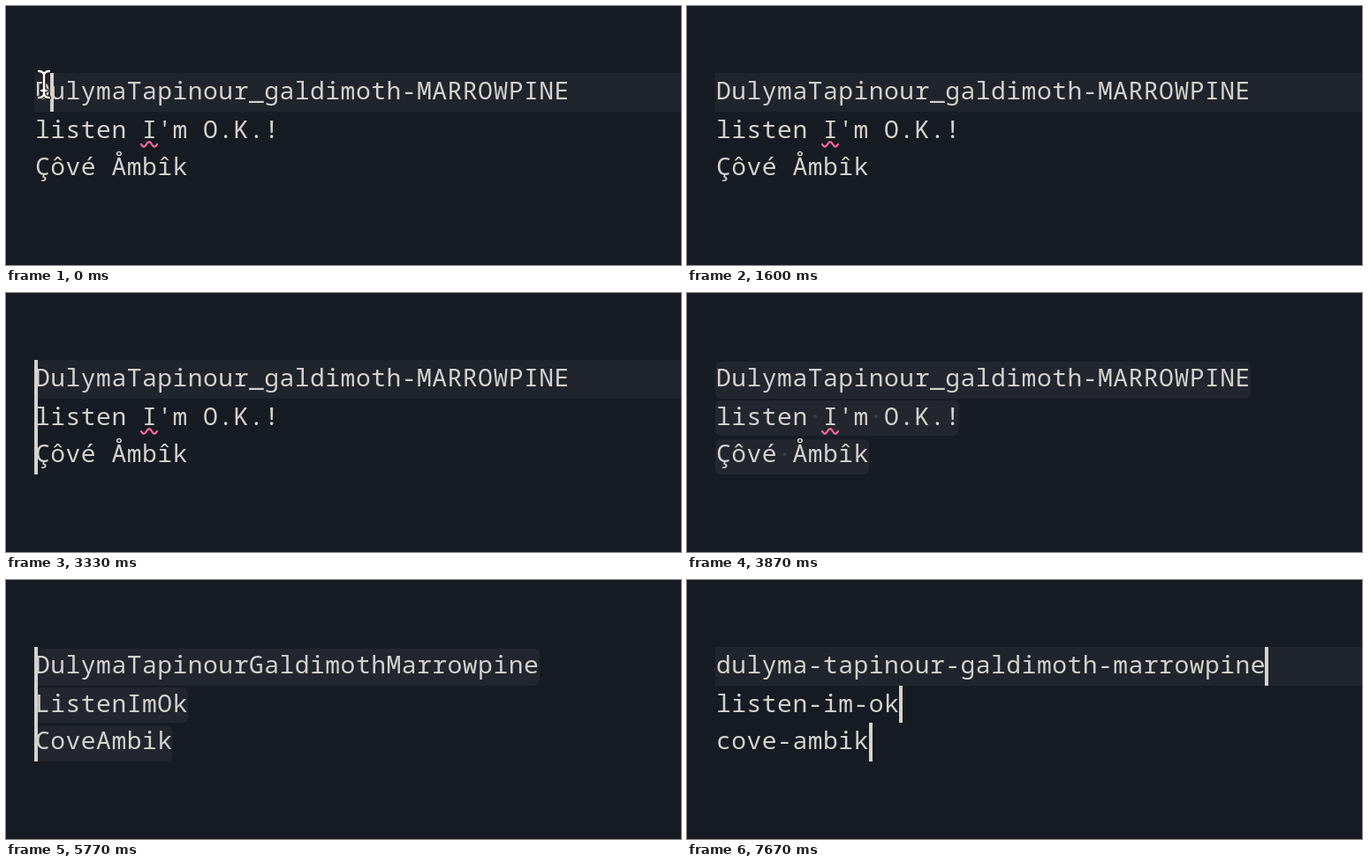
An HTML page that plays this animation: 764 by 294 pixels, repeating every 8000 ms.

```html
<!DOCTYPE html>
<html lang="en">
<head>
<meta charset="utf-8">
<title>Editor case conversion</title>
<style>
  html, body { margin: 0; width: 100%; height: 100%; overflow: hidden; background: #171b23; }
  svg { display: block; width: 764px; height: 294px; }
  text {
    font: 28px "Noto Sans Mono", "DejaVu Sans Mono", monospace;
    letter-spacing: .48px; /* 17.28px per column */
    font-variant-ligatures: none;
    fill: #d3d2cf;
  }
  .line { fill: #20242c; }
  .select { fill: #23252f; }
  .caret { fill: #d6d3cc; }
  .space { fill: #3b3e47; }
  .squiggle { fill: none; stroke: #f2679c; stroke-width: 2.3; stroke-linecap: round; }
  .beam path { fill: none; stroke: #fff; stroke-width: 2.4; stroke-linecap: round; }
  .beam .edge { stroke: #11141a; stroke-width: 4.5; }

  [style*="--on"] { opacity: 0; animation: var(--on) 8s step-end infinite; }

  /* text states */
  @keyframes mixed  { 0% { opacity: 1 } 62.5%, 100% { opacity: 0 } }
  @keyframes pascal { 0% { opacity: 0 } 62.5% { opacity: 1 } 95.875%, 100% { opacity: 0 } }
  @keyframes kebab  { 0% { opacity: 0 } 95.875%, 100% { opacity: 1 } }

  /* current line and selections */
  @keyframes current {
    0% { opacity: 1 } 42.125% { opacity: 0 } 62.5% { opacity: 1 }
    72.125% { opacity: 0 } 95.875%, 100% { opacity: 1 }
  }
  @keyframes pickMixed  { 0% { opacity: 0 } 42.125% { opacity: 1 } 62.5%, 100% { opacity: 0 } }
  @keyframes pickPascal { 0% { opacity: 0 } 72.125% { opacity: 1 } 95.875%, 100% { opacity: 0 } }

  /* carets, blinking every 500 ms */
  @keyframes before { 0% { opacity: 1 } 3.75%, 100% { opacity: 0 } }
  @keyframes first {
    0% { opacity: 0 } 8.75% { opacity: 1 } 15% { opacity: 0 } 21.25% { opacity: 1 }
    27.5% { opacity: 0 } 33.75% { opacity: 1 } 42.125%, 100% { opacity: 0 }
  }
  @keyframes second { 0% { opacity: 0 } 35.875% { opacity: 1 } 42.125%, 100% { opacity: 0 } }
  @keyframes third  { 0% { opacity: 0 } 38.375% { opacity: 1 } 42.125%, 100% { opacity: 0 } }
  @keyframes mixedEnd {
    0% { opacity: 0 } 42.125% { opacity: 1 } 48.375% { opacity: 0 }
    54.625% { opacity: 1 } 60.875%, 100% { opacity: 0 }
  }
  @keyframes pascalEnd { 0% { opacity: 0 } 62.5% { opacity: 1 } 68.75%, 100% { opacity: 0 } }
  @keyframes pascalStart {
    0% { opacity: 0 } 72.125% { opacity: 1 } 78.375% { opacity: 0 }
    84.625% { opacity: 1 } 90.875%, 100% { opacity: 0 }
  }

  .beam { animation: point 8s ease-in-out infinite; }
  @keyframes point {
    0%, 1% { transform: translate(43px, 89px) }
    7%, 11% { transform: translate(35px, 89px) }
    20%, 99.99% { transform: translate(66px, 318px) }
    100% { transform: translate(43px, 89px) }
  }
</style>
</head>
<body>
<svg viewBox="0 0 764 294">
  <defs>
    <rect id="c1" class="caret" y="76" width="4" height="44"/>
    <rect id="c2" class="caret" y="120" width="4" height="42"/>
    <rect id="c3" class="caret" y="162" width="4" height="44"/>
    <path id="ibeam" d="M-6-15Q-1-15 0-11Q1-15 6-15M0-11V11M-6 15Q-1 15 0 11Q1 15 6 15M-3 7H3"/>
  </defs>

  <rect class="line" style="--on: current" x="32" y="76" width="732" height="44"/>

  <g style="--on: pickMixed">
    <g class="select">
      <rect x="32" y="78" width="606" height="42" rx="6"/>
      <rect x="32" y="122" width="276" height="40" rx="6"/>
      <rect x="32" y="166" width="174" height="40" rx="6"/>
    </g>
    <g class="space">
      <circle cx="145" cy="140" r="2"/>
      <circle cx="214" cy="140" r="2"/>
      <circle cx="110.5" cy="183" r="2"/>
    </g>
  </g>
  <g class="select" style="--on: pickPascal">
    <rect x="32" y="78" width="572" height="42" rx="6"/>
    <rect x="32" y="122" width="174" height="40" rx="6"/>
    <rect x="32" y="166" width="156" height="40" rx="6"/>
  </g>

  <g style="--on: mixed">
    <text x="33" y="106">DulymaTapinour_galdimoth-MARROWPINE</text>
    <text x="33" y="150">listen I'm O.K.!</text>
    <text x="33" y="192">Çôvé Åmbîk</text>
    <path class="squiggle" d="M153 157q3 5.5 6 0t6 0t6 0"/>
  </g>
  <g style="--on: pascal">
    <text x="33" y="106">DulymaTapinourGaldimothMarrowpine</text>
    <text x="33" y="150">ListenImOk</text>
    <text x="33" y="192">CoveAmbik</text>
  </g>
  <g style="--on: kebab">
    <text x="33" y="106">dulyma-tapinour-galdimoth-marrowpine</text>
    <text x="33" y="150">listen-im-ok</text>
    <text x="33" y="192">cove-ambik</text>
  </g>

  <use href="#c1" x="50" style="--on: before"/>
  <use href="#c1" x="32" style="--on: first"/>
  <use href="#c2" x="32" style="--on: second"/>
  <use href="#c3" x="32" style="--on: third"/>
  <g style="--on: mixedEnd">
    <use href="#c1" x="638"/><use href="#c2" x="308"/><use href="#c3" x="206"/>
  </g>
  <g style="--on: pascalEnd">
    <use href="#c1" x="604"/><use href="#c2" x="206"/><use href="#c3" x="188"/>
  </g>
  <g style="--on: pascalStart">
    <use href="#c1" x="32"/><use href="#c2" x="32"/><use href="#c3" x="32"/>
  </g>
  <g style="--on: kebab">
    <use href="#c1" x="654"/><use href="#c2" x="240"/><use href="#c3" x="206"/>
  </g>

  <g class="beam">
    <use href="#ibeam" fill="none" stroke="#11141a" stroke-width="4.5" stroke-linecap="round"/>
    <use href="#ibeam" fill="none" stroke="#fff" stroke-width="2.4" stroke-linecap="round"/>
  </g>
</svg>
</body>
</html>
```
